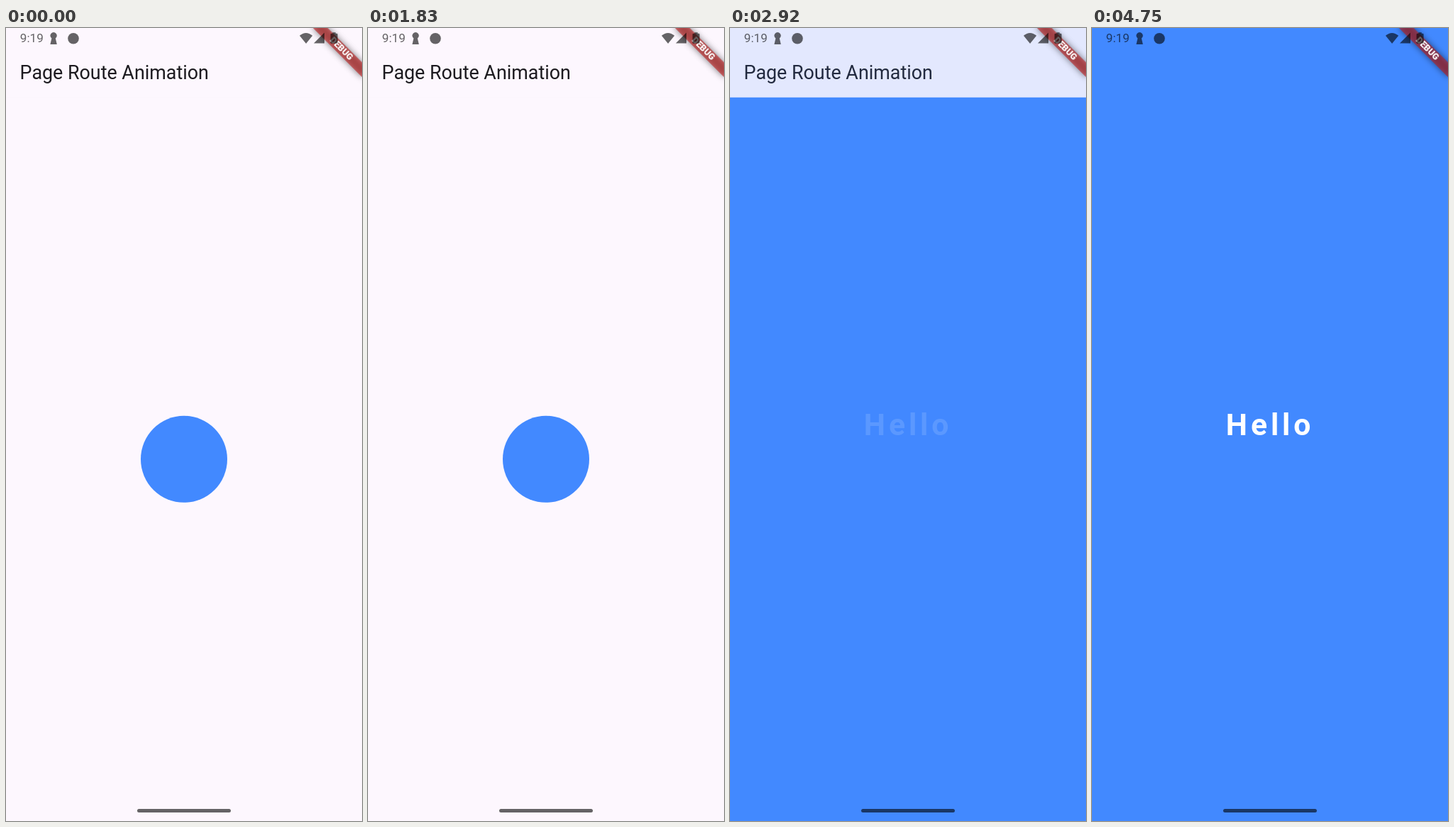
An HTML page that plays this animation: 502 by 1116 pixels, repeating every 4.79 s.

```html
<!DOCTYPE html>
<html lang="en">
<head>
<meta charset="utf-8">
<title>Page Route Animation</title>
<style>
  :root { --loop: 4790ms; --paper: #fdf7fe; --blue: #4289ff; }
  html, body { margin: 0; width: 100%; height: 100%; overflow: hidden; background: var(--paper); }
  svg { display: block; width: 100%; height: 100%; }
  text { font-family: Roboto, sans-serif; }
  .paper { fill: var(--paper); }
  .blue { fill: var(--blue); }
  .title { font-size: 26.87px; fill: #1d1b20; }
  .hello { font-size: 42.75px; font-weight: 700; letter-spacing: 4.886px; fill: #fff; }
  .debug { font-size: 12.46px; font-weight: 900; fill: #fff; text-anchor: middle; }
  .clock { font-size: 17.1px; }
  .system { fill: #000; fill-opacity: .6; }
  .dot { r: 61px; animation: grow var(--loop) linear infinite; }
  .page { opacity: 0; animation: show var(--loop) linear infinite; }

  @keyframes grow {
    0%, 49.33% { r: 61px; }
    54.906% { r: 317px; }
    60.438%, 100% { r: 610px; }
  }
  @keyframes show {
    0%, 60.125% { opacity: 0; }
    66.388%, 100% { opacity: 1; }
  }
</style>
</head>
<body>
<svg viewBox="0 0 502 1116">
  <defs>
    <filter id="soft" x="-30%" y="-150%" width="160%" height="400%">
      <feGaussianBlur stdDeviation="4.8"/>
    </filter>
  </defs>

  <!-- home page -->
  <rect class="paper" width="502" height="1116"/>
  <circle class="dot blue" cx="251" cy="606.8"/>
  <rect class="paper" width="502" height="97.7"/>
  <text class="title" x="19.6" y="72.4">Page Route Animation</text>

  <!-- second page -->
  <g class="page">
    <rect class="blue" width="502" height="1116"/>
    <text class="hello" x="188.8" y="572.6">Hello</text>
  </g>

  <!-- corner banner -->
  <g transform="translate(502 0) rotate(45)">
    <rect x="-48.9" y="34.2" width="97.7" height="14.66" fill="#000" fill-opacity=".5" filter="url(#soft)"/>
    <rect x="-48.9" y="34.2" width="97.7" height="14.66" fill="#b71c1c" fill-opacity=".627"/>
    <text class="debug" x="0" y="45.4">DEBUG</text>
  </g>

  <!-- system bars -->
  <g class="system">
    <text class="clock" x="19.8" y="20.4">9:19</text>
    <path d="M64.4 14.6A4.7 4.7 0 1 1 69.8 14.6L71.8 23H62.4Z"/>
    <circle cx="95" cy="14.8" r="7.8"/>
    <path d="M414 10.8Q423 3.2 432.2 10.8L423.1 22Z"/>
    <path d="M449 6.6V21.6H434Z"/>
    <path d="M460.4 6.2H464.8V7.8H466.4Q467.6 7.8 467.6 9V20.6Q467.6 21.8 466.4 21.8H458.8Q457.6 21.8 457.6 20.6V9Q457.6 7.8 458.8 7.8H460.4Z"/>
    <rect x="185" y="1099" width="132" height="5" rx="2.5"/>
  </g>
</svg>
</body>
</html>
```
